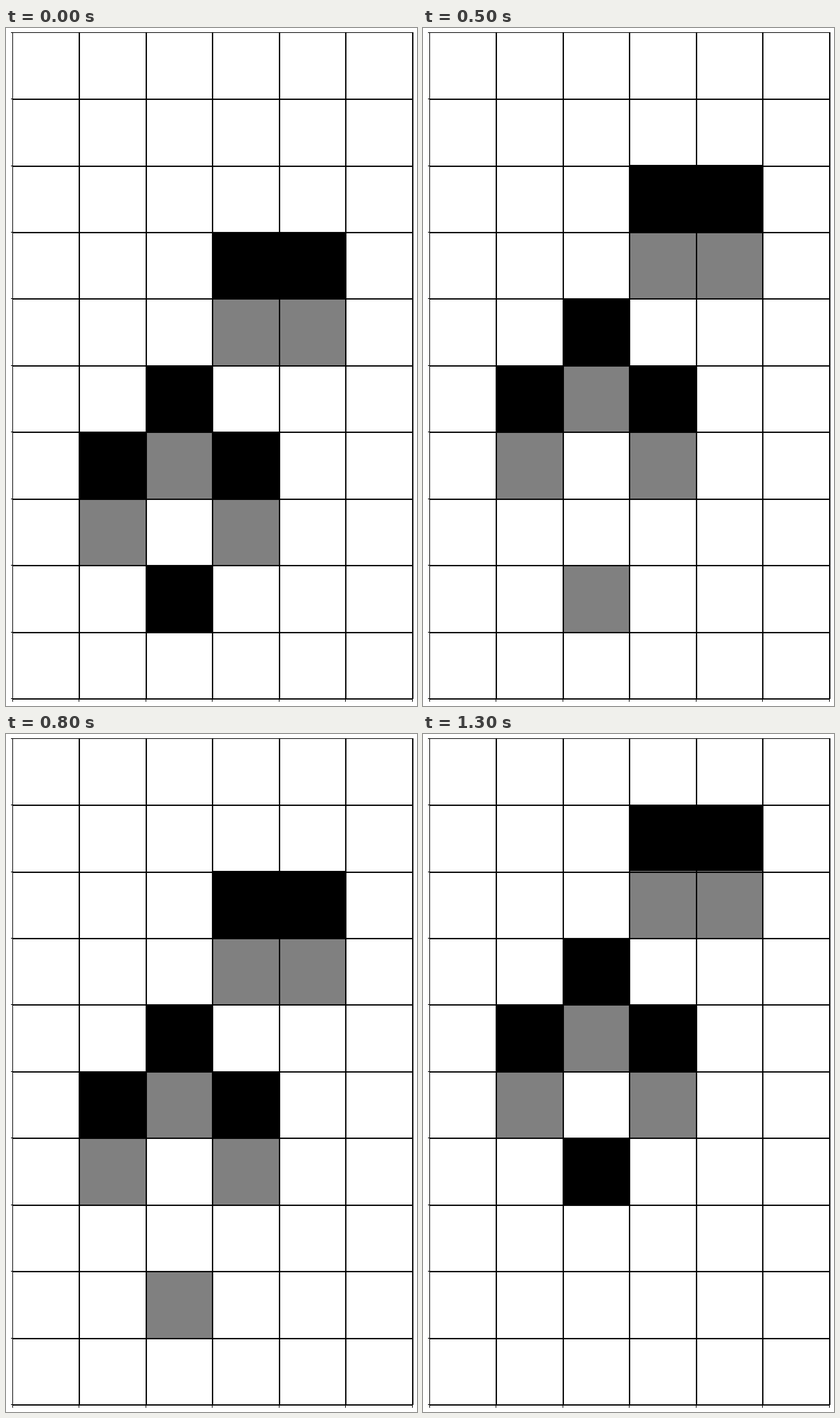
An HTML page for the animation above (1.5 s loop, 583x961 px).

```html
<!DOCTYPE html>
<html lang="en">
<head>
<meta charset="utf-8">
<title>Cell grid</title>
<style>
  html, body { margin: 0; width: 100%; height: 100%; overflow: hidden; background: #fff; }
  svg { display: block; }
</style>
</head>
<body>
<svg width="583" height="961" viewBox="0 0 583 961" shape-rendering="crispEdges">
  <g id="cells"></g>
  <g id="grid" fill-opacity="0.92"></g>
</svg>
<script>
const STEP = 500;
const PITCH = 94.48;
const COLS = 6, ROWS = 10;
const LEFT = 9, TOP = 6, RIGHT = 577, BOTTOM = 951;
const lineX = i => Math.round(9.65 + PITCH * i);
const lineY = i => Math.round(6.55 + PITCH * i);

// Live cells as [column, row] when the pattern is at its lowest position
const swarm = [[3, 3], [4, 3], [2, 5], [1, 6], [3, 6]];
// Row of the blinking cell in each step; it is dead in the middle one
const blinkRow = [8, null, 6];

const cells = document.getElementById('cells');
const grid = document.getElementById('grid');

function rect(parent, x, y, w, h, fill) {
  const r = document.createElementNS('http://www.w3.org/2000/svg', 'rect');
  Object.entries({ x, y, width: w, height: h, fill }).forEach(([k, v]) => r.setAttribute(k, v));
  parent.append(r);
}

function drawGrid() {
  // Thin frame on the left and top, heavier lines elsewhere
  rect(grid, LEFT, TOP, 1, BOTTOM - TOP, '#000');
  rect(grid, LEFT, TOP, RIGHT - LEFT, 1, '#000');
  for (let i = 1; i <= COLS; i++) rect(grid, lineX(i) - 1, TOP, 2, BOTTOM - TOP, '#000');
  for (let i = 1; i <= ROWS; i++) rect(grid, LEFT, lineY(i) - 1, RIGHT - LEFT, 2, '#000');

  for (let i = 0; i <= COLS; i++) rect(grid, lineX(i) - 1, BOTTOM, 1, 4, '#000');
  for (let i = 0; i <= ROWS; i++) rect(grid, LEFT - 2, lineY(i) - 1, 2, 1, '#000');
}

// The second row boundary sits just above its grid line
const edgeY = r => lineY(r) - (r === 2 ? 2 : 0);

function cell(col, row, fill) {
  const x = lineX(col), y = edgeY(row);
  rect(cells, x, y, lineX(col + 1) - x, edgeY(row + 1) - y, fill);
}

function drawStep(n) {
  cells.replaceChildren();
  const live = swarm.map(([c, r]) => [c, r - n]);
  const trail = live.map(([c, r]) => [c, r + 1]);
  if (blinkRow[n] !== null) live.push([2, blinkRow[n]]);
  else trail.push([2, blinkRow[n - 1]]);
  trail.forEach(([c, r]) => cell(c, r, '#808080'));
  live.forEach(([c, r]) => cell(c, r, '#000'));
}

let shown = -1;
function tick() {
  const n = Math.floor(performance.now() / STEP) % blinkRow.length;
  if (n !== shown) drawStep(shown = n);
  requestAnimationFrame(tick);
}

drawGrid();
tick();
</script>
</body>
</html>
```
